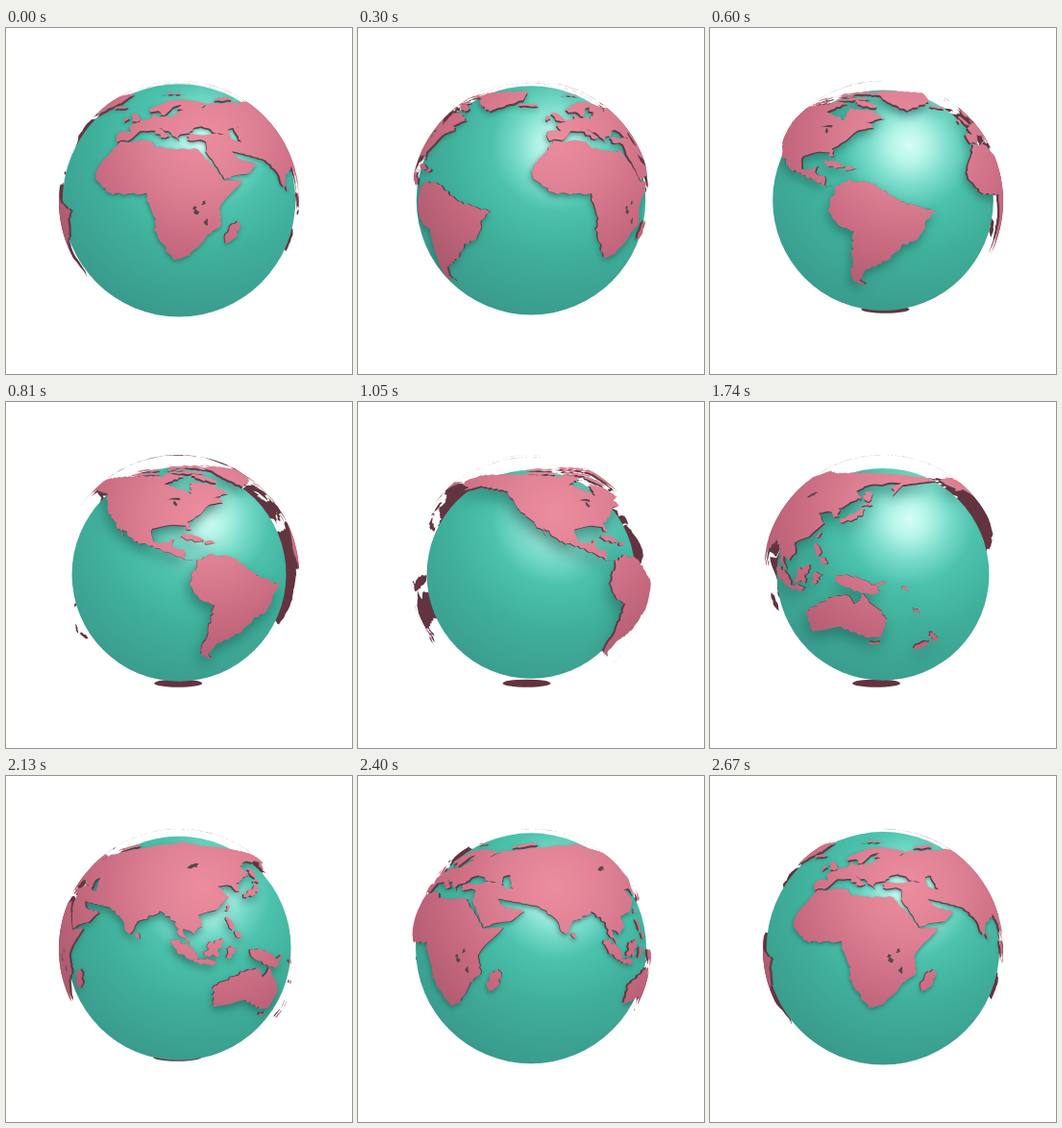
Animation of 360 by 360 pixels, one loop 2.7 s. Source, as an HTML page with a canvas:

```html
<!DOCTYPE html>
<html lang="en">
<head>
<meta charset="utf-8">
<title>Turning globe</title>
<style>
html, body { margin: 0; width: 100%; height: 100%; overflow: hidden; background: #fff; }
canvas { display: block; width: 360px; height: 360px; }
</style>
</head>
<body>
<canvas id="stage" width="360" height="360"></canvas>
<script>
const ctx = document.getElementById('stage').getContext('2d');
const LOOP = 2700, CX = 180, CY = 180, SHELL = 125;
const DIST = 7, FOCAL = SHELL * Math.sqrt(DIST * DIST - 1), LIMB = 1 / DIST;
const LAT_SCALE = 0.72, RAD = Math.PI / 180;

// Split edges into short steps with a slightly ragged coast: lon, cos lat, sin lat
function coast(...p) {
  const out = [], n = p.length;
  for (let i = 0; i < n; i += 2) {
    const dLon = p[(i + 2) % n] - p[i], dLat = p[(i + 3) % n] - p[i + 1];
    const steps = Math.ceil(Math.hypot(dLon, dLat) / 2);
    for (let s = 0; s < steps; s++) {
      const a = p[i] + dLon * s / steps, b = p[i + 1] + dLat * s / steps;
      const lon = a + 0.6 * Math.sin(a * 3.1 + b * 5.7);
      const lat = (b + 0.6 * Math.sin(a * 4.3 - b * 2.9)) * LAT_SCALE * RAD;
      out.push([lon * RAD, Math.cos(lat), Math.sin(lat)]);
    }
  }
  return out;
}

// Long blob: centre, half length, tilt
function isle(lon, lat, size, tilt = 0) {
  const pts = [], stretch = Math.cos(lat * RAD);
  for (let i = 0; i < 8; i++) {
    const t = i * Math.PI / 4, u = size * Math.cos(t), v = size * 0.35 * Math.sin(t);
    const c = Math.cos(tilt * RAD), s = Math.sin(tilt * RAD);
    pts.push(lon + (u * c - v * s) / stretch, lat + u * s + v * c);
  }
  return coast(...pts);
}

const africa = coast(-6, 36, 10, 37, 11, 33, 20, 31, 32, 31, 37, 21, 43, 11.5, 51, 12, 40, -3, 41, -15, 35, -20,
  28, -33, 20, -35, 12, -17, 13.5, -10, 9, 0, 9, 4, -8, 4.5, -17, 14, -16, 21, -10, 31);
const europe = coast(-9, 37, -9, 43, -2, 43.5, -4, 48.5, 8, 54, 9, 57.5, 11, 54.5, 19, 54.5, 24, 59.3, 36, 61,
  44, 67, 62, 69, 62, 50, 50, 46, 48, 41.5, 41.5, 41.5, 38, 46, 31, 46.5, 28, 41, 23, 40.5, 22.5, 36.5,
  19, 42, 13, 45.5, 18, 40, 16, 38, 9, 44.3, 3, 43, -2, 37);
const nordic = coast(29, 60, 22, 60.5, 25, 65.5, 18, 62, 14, 55.5, 11, 59, 6, 58, 5, 62, 16, 69, 26, 71, 41, 67, 36, 60);
const siberia = coast(60, 48, 60, 69, 80, 73, 104, 77.5, 113, 73.5, 160, 70, 190, 66, 179, 63, 163, 59, 157, 51,
  156, 57, 163, 62, 142, 59, 136, 54.5, 140, 48);
const asia = coast(27, 40, 41.5, 41.5, 49, 41, 49, 37.5, 54, 37, 52, 46, 60, 50, 140, 50, 129, 41, 129, 36, 126.5, 35,
  125, 39, 118, 39, 122, 31, 115, 22.5, 107, 20.5, 109, 13, 105, 9, 100, 12, 104, 1.5, 98.5, 9, 97, 16, 91, 22,
  80, 15, 77.5, 8, 73, 18, 66.5, 25, 48, 30, 36, 36.5, 27, 37);
const arabia = coast(48, 30, 51, 25, 60, 22.5, 55, 17, 43, 12.8, 34.5, 29, 36, 36.5, 43, 37);
const northAmerica = coast(-168, 66, -156, 71, -128, 70, -96, 68, -93, 71, -82, 68, -94, 60, -81, 54, -79, 52,
  -78, 62, -65, 60, -56, 53, -66, 50, -61, 46, -70, 43, -76, 36, -81, 31.5, -80, 26, -84, 30, -97, 28, -97, 20,
  -91, 18.5, -87, 21.3, -88, 16, -83.5, 15, -82, 9, -77, 8, -85, 10, -95, 16, -105, 20, -113, 30, -110, 23,
  -117, 33, -124, 41, -130, 54, -150, 60, -164, 55, -158, 59, -165, 62);
const southAmerica = coast(-77, 8.5, -72, 12, -62, 10.5, -50, 0, -35, -6, -39, -13, -41, -22, -48, -26, -54, -34.5,
  -58, -38, -65, -42, -69, -51, -66, -55, -74, -51, -71, -30, -70, -18, -76, -14, -81, -5);
const australia = coast(114, -22, 130, -12, 136, -12, 139, -17.5, 142, -11, 153, -26, 150, -37.5, 144, -38.5,
  131, -31.5, 115, -34.5);
const greenland = coast(-73, 78, -60, 82, -20, 81.5, -23, 70, -43, 60, -54, 68, -60, 76);

const arctic = [isle(-111, 71, 4), isle(-110, 75.5, 3), isle(-80, 72, 4), isle(-69, 66.5, 5, -55), isle(-88, 75.7, 2.5),
  isle(-78, 79.5, 4, 25), isle(59, 73.5, 4, 45), isle(18, 79, 2)];
const atlantic = [isle(-2, 54, 4.5, 110), isle(-8, 53.5, 2, 90), isle(-19, 65, 3), isle(-79, 21.8, 5, -18),
  isle(-71, 19, 2.5)];
const indian = [isle(46.5, -19, 7, 70), isle(81, 7.7, 2, 100), isle(101, -.5, 8, -47), isle(110, -7.3, 5, -8)];
const pacific = [isle(140, -5.5, 11, -25), isle(114, 1, 6.5, 50), isle(113, 0, 5, 110), isle(121, -2, 4, 80),
  isle(122, 0, 3), isle(121, 15, 4, 110), isle(125, 8, 3, 130), isle(136, 35, 5, 35), isle(140.5, 38.5, 3, 75),
  isle(143, 43.5, 2.2), isle(143, 50, 4, 90), isle(121, 24, 2, 70), isle(147, -42, 2.2), isle(176, -38, 3.2, 125),
  isle(170.5, -44, 4.2, 45), isle(150, -5, 2, 20), isle(165.5, -21, 2, -40), isle(160, -8, 2, -40)];
const lakes = [isle(33, -1, 1.8, 60), isle(30, -6, 2.8, 115), isle(34.5, -12, 2.5, 95), isle(107, 53.5, 3, 50),
  isle(-88, 47.5, 2.5), isle(-87, 44, 2, 90)];
const lands = [africa, europe, nordic, siberia, asia, arabia, northAmerica, southAmerica, australia, greenland,
  ...arctic, ...atlantic, ...indian, ...pacific];

// Points on the hidden side slide to the limb
function outline(shapes, turn, side, size) {
  const path = new Path2D();
  for (const shape of shapes) {
    let seen = false;
    const pts = shape.map(([lon, c, y]) => {
      const x = c * Math.sin(lon - turn), z = c * Math.cos(lon - turn);
      const shown = (z - LIMB) * side > 0;
      const k = shown ? size * FOCAL / (DIST - size * z) : size * SHELL / (Math.hypot(x, y) || 1);
      seen = seen || shown;
      return [CX + x * k, CY - y * k];
    });
    if (!seen) continue;
    pts.forEach(([x, y], i) => i ? path.lineTo(x, y) : path.moveTo(x, y));
    path.closePath();
  }
  return path;
}

function glow(x, y, r, stops) {
  const g = ctx.createRadialGradient(x, y, 0, x, y, r);
  for (const [at, color] of stops) g.addColorStop(at, color);
  return g;
}

const seaPaint = glow(207, 122, 190, [[0, '#d6fdf6'], [0.1, '#b4f5e8'], [0.22, '#7bdccb'],
  [0.36, '#4cc2ac'], [0.6, '#40b09b'], [1, '#39988a']]);
const landPaint = glow(205, 115, 190, [[0, '#ec8c9f'], [0.3, '#de8093'], [0.6, '#c86a80'], [1, '#a4566a']]);

function oval(x, y, rx, ry, color) {
  ctx.fillStyle = color;
  ctx.beginPath();
  ctx.ellipse(x, y, rx, ry, 0, 0, 2 * Math.PI);
  ctx.fill();
}

function fill(path, color) {
  ctx.fillStyle = color;
  ctx.fill(path);
}

function draw(now) {
  const a = (now % LOOP) / LOOP * 2 * Math.PI;
  const turn = 23 * RAD - a;
  const sea = 114.2 + 7 * Math.cos(a + 0.09);
  const gap = SHELL - sea;
  ctx.clearRect(0, 0, 360, 360);

  // Far side of the shell and the southern cap
  fill(outline(lands, turn, -1, 1), '#63343f');
  oval(179 + 7 * Math.cos(a - 0.35), 292.7, 25, 4, '#63343f');
  oval(CX, CY - 0.7, sea, sea, seaPaint);

  // Land shadow, softer as the sea sinks
  const front = outline(lands, turn, 1, 1);
  ctx.save();
  ctx.beginPath();
  ctx.arc(CX, CY - 0.7, sea, 0, 2 * Math.PI);
  ctx.clip();
  ctx.translate(-gap * 0.15, gap * 0.5);
  ctx.filter = `blur(${gap * 0.5}px)`;
  ctx.globalAlpha = 0.8;
  fill(front, '#256f63');
  ctx.restore();

  fill(outline(lands, turn, 1, 0.982), '#5b3d45');
  fill(front, landPaint);
  fill(outline(lakes, turn, 1, 1), '#54474c');
}

function tick() {
  draw(performance.now());
  requestAnimationFrame(tick);
}
tick();
</script>
</body>
</html>
```
